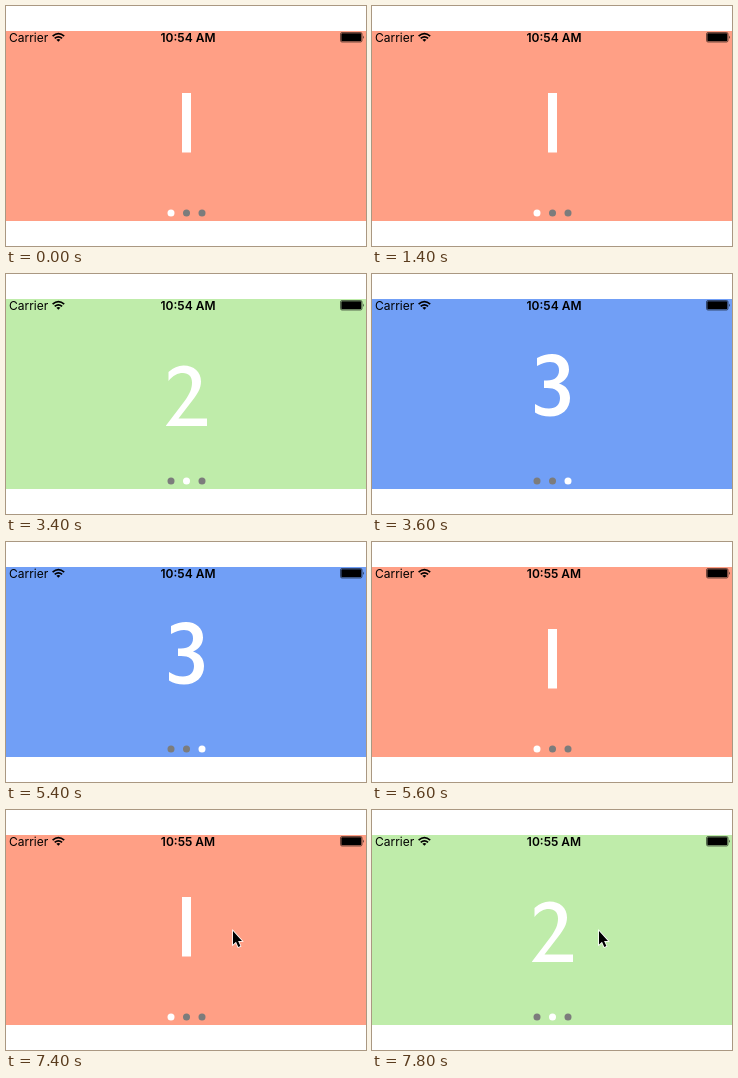
Write an HTML page that moves like this. It is 360 px wide and 240 px high and loops after 8 s.

```html
<!DOCTYPE html>
<html lang="en">
<head>
<meta charset="utf-8">
<title>Page carousel</title>
<style>
  html, body { margin: 0; width: 100%; height: 100%; overflow: hidden; background: #fff; }
  svg { display: block; width: 100vw; height: 100vh; }
  text { font: 12px Inter, Roboto, sans-serif; }
  #clock { font-weight: 600; text-anchor: middle; }
</style>
</head>
<body>
<svg viewBox="0 0 360 240">
  <rect id="page" y="25" width="360" height="190"/>
  <path id="digit" fill="#fff"/>

  <text x="3" y="36">Carrier</text>
  <g fill="none" stroke="#000" stroke-width="1.7">
    <path d="M46.6 30.2Q52.4 25.1 58.2 30.2"/>
    <path d="M48.7 32.4Q52.4 29.2 56.1 32.4"/>
  </g>
  <path d="M50.4 33.7Q52.4 32.1 54.4 33.7L52.4 35.8Z"/>
  <text id="clock" x="182" y="36"></text>
  <rect x="334.5" y="26.5" width="21.5" height="9.5" rx="1.5" fill="none" stroke="#000" stroke-opacity=".55"/>
  <rect x="335.3" y="27.3" width="20" height="8" rx=".8"/>
  <path d="M357 29.5Q358.6 31.2 357 33Z" fill-opacity=".8"/>

  <g id="dots">
    <circle cx="165" cy="207" r="3.5"/>
    <circle cx="180.5" cy="207" r="3.5"/>
    <circle cx="196" cy="207" r="3.5"/>
  </g>
  <path id="cursor" d="M227 121V134.5L230 131.8L232.3 137L234.4 136L232.1 131H236Z"
        stroke="#fff" stroke-width="1.6" paint-order="stroke"/>
</svg>
<script>
const LOOP = 8000, PAGE_TIME = 2000, FIRST_TURN = 1600;
const MINUTE_TURN = 5600, CURSOR_IN = 6600;

const pages = [
  { color: '#ff9f85', digit: 'M176 87H185V146.5H176Z' },
  { color: '#bfecaa', digit: `M162.5 98Q169.5 91.5 177.5 91.5C188 91.5 195 98 195 107.5
      C195 114.5 191.5 120 186 127L172.5 144.5H201V152H160V151.5L179 126.5
      C184 119.5 186 114.5 186 108.5C186 102.5 182.5 99 177 99C171.5 99 167 101.5 162.5 107Z` },
  { color: '#719ff6', digit: `M165 84C170 81.5 175 80 180 80C190 80 197 86 197 95.5
      C197 102 193 107 187 109.5C194 111.5 198 117 198 124C198 135 190 142.5 178 142.5
      C172 142.5 167 141 163 138.5V130C168 133 172 134.5 177 134.5
      C184 134.5 188 130.5 188 124C188 117 183 114 175 114H172V106.5H175
      C183 106.5 187 102.5 187 96.5C187 91 184 88 178 88C174 88 170 89.5 165 92Z` }
];

const byId = id => document.getElementById(id);
const [page, digit, clock, dots, cursor] =
  ['page', 'digit', 'clock', 'dots', 'cursor'].map(byId);

function draw(time) {
  const turns = Math.floor((time - FIRST_TURN + PAGE_TIME) / PAGE_TIME);
  const current = turns % pages.length;
  page.setAttribute('fill', pages[current].color);
  digit.setAttribute('d', pages[current].digit);
  [...dots.children].forEach((dot, i) =>
    dot.setAttribute('fill', i === current ? '#fff' : '#7c7c7c'));
  clock.textContent = time < MINUTE_TURN ? '10:54 AM' : '10:55 AM';
  cursor.style.display = time < CURSOR_IN ? 'none' : '';
}

const start = performance.now();
function tick() {
  draw((performance.now() - start) % LOOP);
  requestAnimationFrame(tick);
}
tick();
</script>
</body>
</html>
```
